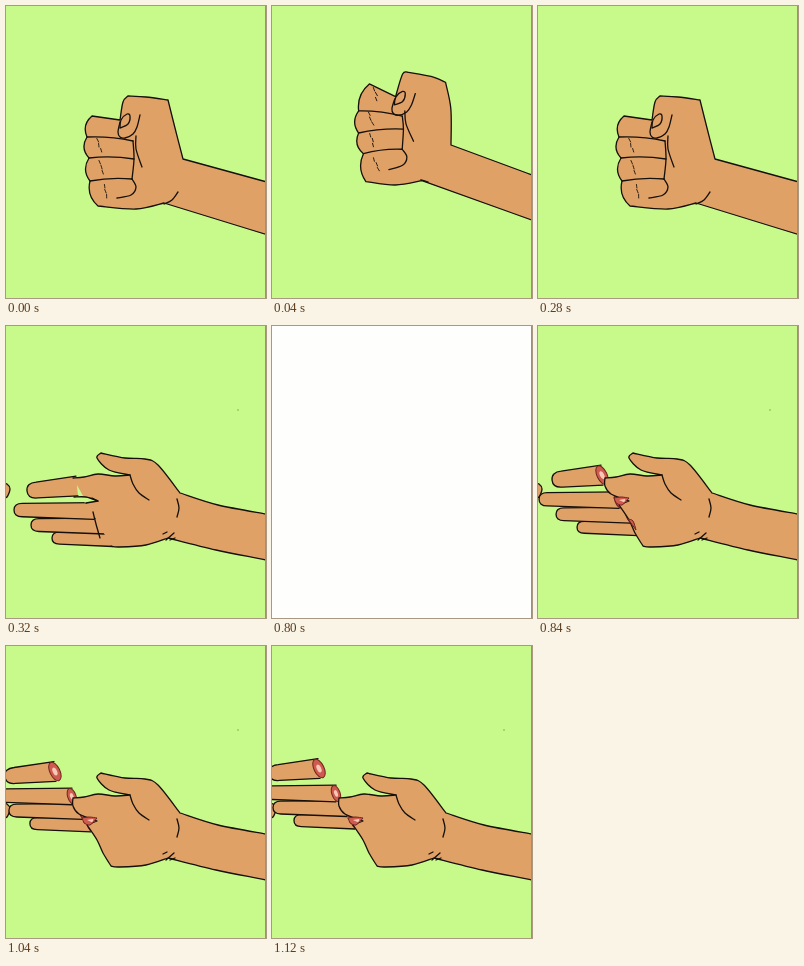
Write an HTML page that moves like this. It is 260 px wide and 292 px high and loops after 1.16 s.

```html
<!DOCTYPE html>
<html lang="en">
<head>
<meta charset="utf-8">
<title>Hand game</title>
<style>
  html, body { margin: 0; width: 100%; height: 100%; overflow: hidden; background: #c8f98b; }
  svg { display: block; width: 260px; height: 292px; }
  path { stroke: #15100b; stroke-width: 1.3; stroke-linecap: round; stroke-linejoin: round; fill: none; }
  .skin { fill: #e0a167; }
  .gap { fill: #c8f98b; }
  .thin { stroke-width: .9; }
  .blood { fill: #cf5a50; stroke: #6b241c; stroke-width: 1; }
  .bone { fill: #f6c9b4; stroke: none; }
  .whole .blood, .whole .bone { display: none; }
</style>
</head>
<body>
<svg id="stage" viewBox="0 0 260 292">
  <rect id="back" width="260" height="292"/>
</svg>
<script>
const LOOP = 1160, STEP = 40;
const stage = document.getElementById("stage");
const back = document.getElementById("back");

function node(tag, attrs, parent) {
  const el = document.createElementNS("http://www.w3.org/2000/svg", tag);
  for (const key in attrs) el.setAttribute(key, attrs[key]);
  parent.append(el);
  return el;
}
const group = (parent = stage, transform = "") => node("g", { transform }, parent);
const path = (parent, cls, d) => node("path", { class: cls, d }, parent);
const draw = (parent, cls, ...shapes) => shapes.map(s => path(parent, cls, curve(s)));

// Smooth curve through the points; "|" marks a sharp corner.
function curve(text) {
  let d = "", last = null;
  for (const part of text.split("|")) {
    const p = part.trim().split(/\s+/).map(s => s.split(",").map(Number));
    if (last) p.unshift(last);
    else d = "M" + p[0];
    for (let i = 0; i < p.length - 1; i++) {
      const a = p[i - 1] || p[i], b = p[i], c = p[i + 1], e = p[i + 2] || c;
      const near = [0, 1].map(k => b[k] + (c[k] - a[k]) / 6);
      const far = [0, 1].map(k => c[k] - (e[k] - b[k]) / 6);
      d += `C${near} ${far} ${c}`;
    }
    last = p[p.length - 1];
  }
  return d;
}

// Arc from a to b, swelling to the left of its direction
function bulge(a, b, size) {
  const dx = b[0] - a[0], dy = b[1] - a[1], len = Math.hypot(dx, dy);
  const mid = [(a[0] + b[0]) / 2 + dy / len * size, (a[1] + b[1]) / 2 - dx / len * size];
  return `Q${mid} ${b}`;
}

let seed = 7;
const random = () => (seed = seed * 16807 % 2147483647) / 2147483647;

// Short strokes running down a finger
function hatch(parent, x, y) {
  for (let i = -1; i <= 1; i++) {
    const px = x + i * 1.2 + random() * 2, py = y + i * 5;
    draw(parent, "thin", `${px},${py - 2} ${px + random() * 2},${py + 1.5}`);
  }
}

function thumb(parent, x, y, turn) {
  const g = group(parent, `translate(${x} ${y}) rotate(${turn})`);
  draw(g, "", "0,0 1,-8 7,-14 10,-12 8,-4 0,0", "0,-6 -2,4 0,9 5,10 13,6 17,-1 20,-13");
}

function fist({ hand, knuckles, creases, thumbAt, wrist, plain }) {
  const g = group();
  let d = curve(hand);
  for (let i = knuckles.length - 1; i > 0; i--) d += bulge(knuckles[i], knuckles[i - 1], 8);
  path(g, "skin", d + "Z");

  creases.forEach((end, i) => path(g, "", "M" + knuckles[i + 1] + bulge(knuckles[i + 1], end, 3)));
  const from = ([x, y], ...moves) => moves.map(([dx, dy]) => [x + dx, y + dy]).join(" ");
  draw(g, "",
    creases.join(" "),
    from(creases[2], [0, 0], [4, 8], [-1, 16], [-15, 19]),
    from(creases[0], [3, -5], [3, 8], [9, 26]),
    wrist);
  for (let i = plain; i < 4; i++) {
    const [a, b] = [knuckles[i], knuckles[i + 1]];
    hatch(g, (a[0] + b[0]) / 2 + 10, (a[1] + b[1]) / 2 - 2);
  }
  thumb(g, ...thumbAt);
  return g;
}

const lowFist = fist({
  hand: "114,114 | 117,96 122,90 | 140,91 162,94 | 169,122 177,153 | 330,195 | 330,250 | 158,197 | 130,203 92,200",
  knuckles: [[86, 110], [81, 131], [83, 152], [84, 175], [92, 200]],
  creases: [[127, 135], [128, 153], [126, 173]],
  thumbAt: [114, 122, 0],
  wrist: "158,198 166,194 172,186",
  plain: 1
});

const highFist = fist({
  hand: "133,68 | 142,46 148,45 | 170,51 184,58 | 187,85 184,121 | 330,190 | 330,236 | 152,154 | 125,156 96,150",
  knuckles: [[108, 53], [95, 79], [93, 101], [96, 122], [96, 150]],
  creases: [[138, 88], [138, 101], [135, 121]],
  thumbAt: [131, 76, 10],
  wrist: "151,153 158,156",
  plain: 0
});

// Tapered finger with a cut face at its root
function finger(parent, x, y, rootX, rootY, r) {
  const len = Math.hypot(rootX - x, rootY - y);
  const angle = Math.atan2(rootY - y, rootX - x) * 180 / Math.PI;
  const g = group(parent, `translate(${x} ${y}) rotate(${angle})`);
  const w = r * .8;
  path(g, "skin", `M${len} ${-r}L${r} ${-w}Q0 ${-w} 0 0Q0 ${w} ${r} ${w}L${len} ${r}`);
  const face = group(g, `translate(${len} 0) rotate(-20)`);
  for (const [cls, k] of [["blood", 1], ["bone", .42]])
    path(face, cls, `M0 ${-r * k}A${r * k / 2} ${r * k} 0 1 1 0 ${r * k}A${r * k / 2} ${r * k} 0 1 1 0 ${-r * k}Z`);
}

const hand = group();
node("circle", { cx: 232, cy: 84, r: .7, fill: "#718b51" }, hand);
draw(hand, "skin", "-3,158 1,158 4,163 1,171 -3,171");

const fingers = group(hand);
finger(fingers, 46, 212, 107, 213, 7.5);
finger(fingers, 25, 199, 99, 200, 8);
finger(fingers, 8, 184, 88, 185, 8.3);
finger(fingers, 21, 165, 71, 160, 10);

const OUTLINE = `67,152 78,151 92,148 109,150 124,149 | 103,144 91,132 95,127 | 119,132 139,133 152,139 174,167 |
  212,179 260,188 | 275,191 | 275,238 | 260,234 210,224 162,212 | 140,219 113,221 105,220`;

const wholePalm = group(hand);
draw(wholePalm, "skin", OUTLINE);
draw(wholePalm, "gap", "68,171 80,171 92,175 | 80,177");
draw(wholePalm, "", "87,186 90,198 94,212", "92,175 86,172");

const cutPalm = group(hand);
draw(cutPalm, "skin", OUTLINE + " | 97,207 91,194 81,179 | 91,175 | 73,168 67,160 67,152");
const nick = group(cutPalm);
draw(nick, "blood", "76,172 83,171 91,172 | 84,179 78,177 | 76,172");
draw(nick, "bone", "81,174 87,173 86,176 81,174");
const side = draw(cutPalm, "blood", "90,193 95,195 98,204 | 90,193")[0];
const spray = group(cutPalm);
draw(spray, "blood", "70,172 78,175 91,171 | 89,178 80,180 | 82,191 | 75,195 | 76,183 | 70,172");
const drop = draw(spray, "", "87,209 89,214")[0];

draw(hand, "", "124,149 127,158 133,167 143,174", "171,173 173,182 171,191",
  "157,208 161,206", "160,214 168,207", "164,214 169,212");

node("rect", { x: 259, width: 1, height: 292, fill: "#929292" }, stage);

const show = (el, on) => el.setAttribute("display", on ? "inline" : "none");

function render(time) {
  const t = Math.floor(time % LOOP / STEP) * STEP;
  const flash = t === 800;
  const cut = t > 800;

  back.setAttribute("fill", flash ? "#fefefc" : "#c8f98b");
  show(lowFist, t < 40 || t === 280);
  show(highFist, t >= 40 && t < 280);
  show(hand, t >= 320 && !flash);

  // Halfway up the swing
  highFist.setAttribute("transform", t < 120 ? "translate(-5 18) rotate(-5 184 121)" : "");

  const age = Math.max(0, t - 800);
  const drift = 41 * (1 - Math.exp(-age / 130));
  const spraying = age >= 120 && age <= 200;
  fingers.setAttribute("transform", `translate(${-.64 * drift} ${-drift})`);
  fingers.classList.toggle("whole", !cut);
  show(wholePalm, !cut);
  show(cutPalm, cut);
  show(nick, !spraying);
  show(spray, spraying);
  show(side, age < 120);
  drop.setAttribute("transform", `translate(0 ${(age - 160) * .2})`);
}

const start = performance.now();
function tick() {
  render(performance.now() - start);
  requestAnimationFrame(tick);
}
tick();
</script>
</body>
</html>
```
